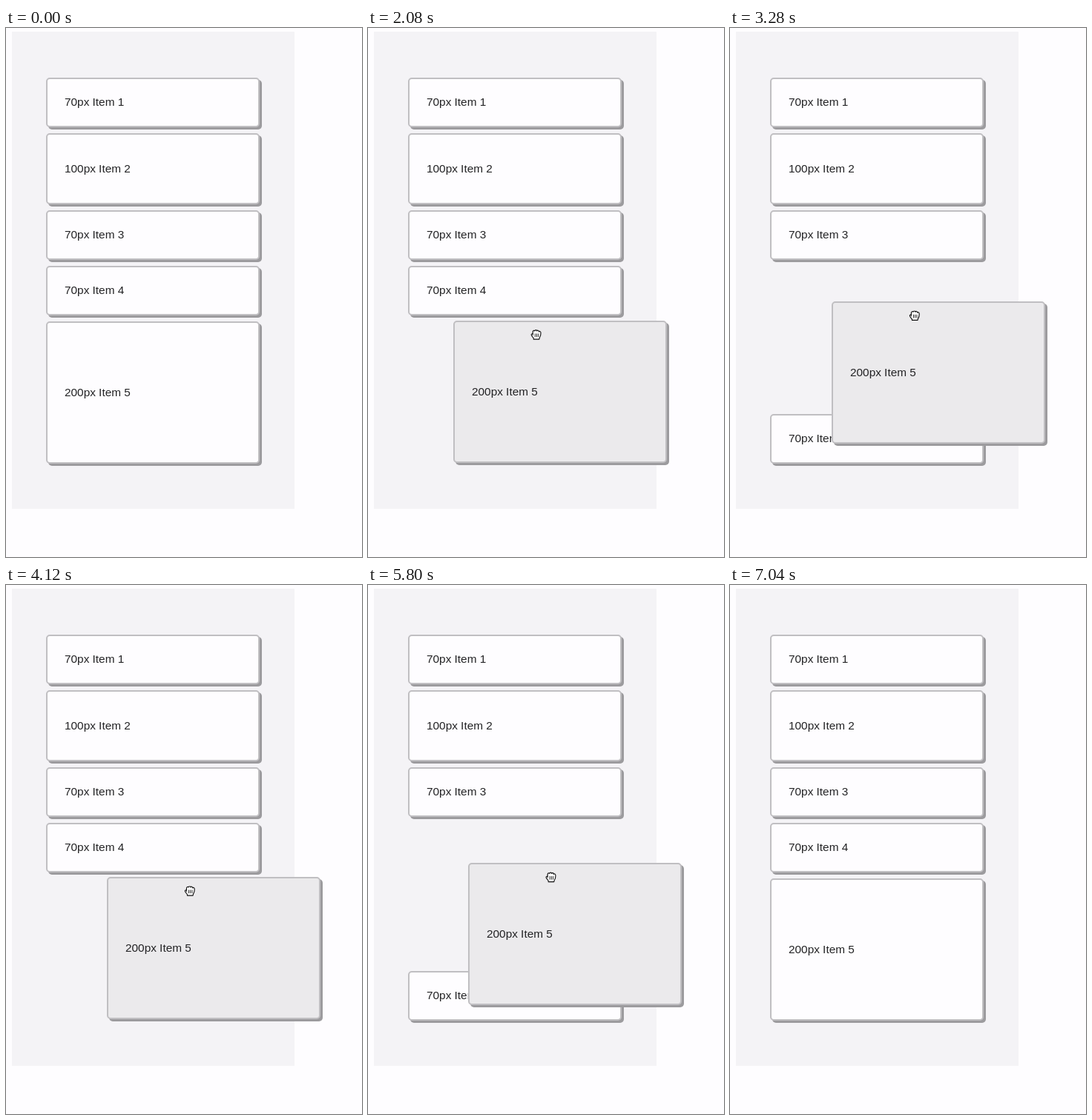
Animation, 480 px wide and 714 px high, one loop 7880 ms. Source, as an HTML page:

```html
<!DOCTYPE html>
<html lang="en">
<head>
<meta charset="utf-8">
<title>Sortable list</title>
<style>
  html, body { margin: 0; width: 100%; height: 100%; overflow: hidden; background: #fefdff; }
  #stage { position: relative; width: 480px; height: 714px; overflow: hidden; }
  .panel { position: absolute; left: 8px; top: 5px; width: 381px; height: 644px; background: #f4f3f6; }
  .card {
    position: absolute; left: 54px; top: var(--y); width: 288px; height: var(--h);
    box-sizing: border-box; padding: 0 0 1px 23px;
    display: flex; align-items: center;
    border: 2px solid #c0bfc2; border-radius: 5px;
    background: #fefdff; box-shadow: 3px 3px #9c9b9e;
    font: 15.36px "Liberation Sans", Arial, sans-serif; color: #232325; white-space: nowrap;
  }
  .card.dragged { background: #ebeaec; z-index: 1; }
  #cursor { position: absolute; left: 0; top: 0; z-index: 2; overflow: visible; }
  #cursor g { display: none; stroke-linejoin: round; stroke-linecap: round; }
  #cursor[data-kind=arrow] .arrow, #cursor[data-kind=grab] .grab, #cursor[data-kind=grabbing] .grabbing { display: inline; }
  .grab, .grabbing { fill: #fff; stroke: #111; stroke-width: 1.15; }
  .arrow { fill: #000; stroke: #fff; stroke-width: 1; }
</style>
</head>
<body>
<div id="stage">
  <div class="panel"></div>
  <div class="card" style="--y:67px;--h:67px">70px Item 1</div>
  <div class="card" style="--y:142px;--h:96px">100px Item 2</div>
  <div class="card" style="--y:246px;--h:67px">70px Item 3</div>
  <div class="card" id="item4" style="--y:321px;--h:67px">70px Item 4</div>
  <div class="card" id="item5" style="--y:396px;--h:192px">200px Item 5</div>
  <svg id="cursor" width="1" height="1">
    <g class="arrow"><path d="M0 0V15.5L3.6 12.2 6 17.5 8.2 16.5 5.9 11.4H10.6Z"/></g>
    <g class="grab" transform="translate(0 -2)">
      <path d="M-4.5 3.5L-7.4 -.2C-8.3 -1.6 -6.6 -2.8 -5.4 -1.6L-4 0L-5.6 -5C-6 -6.8 -3.8 -7.3 -3.2 -5.6L-2.2 -2.2L-2.4 -7C-2.4 -9 .1 -9 .2 -7L.4 -2.4L1.4 -6.8C1.8 -8.6 4 -8.2 3.8 -6.2L3.2 -2L4.8 -4.4C5.6 -6 7.8 -5 7.2 -3.4C6.2 -.4 6.6 1.4 4.8 4.6L4.4 8H-3C-3 6 -3.8 4.8 -4.5 3.5Z"/>
    </g>
    <g class="grabbing">
      <path d="M-4.6 -.8C-6.3 -1.2 -7 -.2 -6.4 1C-5.8 2.4 -4.6 3.6 -3.7 4.8L-3.5 6.4H4L4.4 4.6C5.6 2.8 6.3 1 6.2 -2C6.2 -4.6 4.2 -4.8 3.7 -3.8C3.6 -5.8 1.4 -6 .9 -4.8C.6 -6.4 -1.6 -6.4 -1.9 -4.8C-2.6 -6 -4.6 -5.4 -4.6 -3.4Z"/>
      <path d="M-4.6 -1V1M-1.5 -.8V3M.7 -.8V3M2.9 -.8V3" stroke-width=".9"/>
    </g>
  </svg>
</div>
<script>
const LOOP = 7880, TICK = 40, SHIFT = 200, MOVE = 300;
const GRAB = 1760, DROP = 6180, RELEASE = 6600, LEAVE = 7040;

// CSS-style cubic-bezier timing function
function bezier(x1, y1, x2, y2) {
  const at = (a, b, s) => 3 * a * s * (1 - s) ** 2 + 3 * b * s * s * (1 - s) + s ** 3;
  return p => {
    if (p <= 0) return 0;
    if (p >= 1) return 1;
    let lo = 0, hi = 1;
    for (let i = 0; i < 24; i++) {
      const mid = (lo + hi) / 2;
      if (at(x1, x2, mid) < p) lo = mid; else hi = mid;
    }
    return at(y1, y2, lo);
  };
}
const linear = p => p;
const ease = bezier(.25, .1, .25, 1);
const inOut = bezier(.4, 0, .6, 1);
const outQuad = p => p * (2 - p);
const inQuad = p => p * p;
const snap = bezier(.2, 1, .1, 1);

// Pointer path: [time, x, y, easing towards this point]
const path = [
  [40, 397, 582], [560, 188, 414.5, outQuad], [640, 192, 414.5],
  [800, 192, 414.5], [1080, 170.5, 406.5, inOut],
  [1280, 170.5, 406.5], [1560, 166, 415, inOut],
  [1760, 166, 415], [1880, 178, 416, inQuad], [2360, 252, 412.5, outQuad],
  [2520, 252, 412.5], [2680, 249, 407], [3200, 249, 388],
  [3600, 249, 388], [4160, 248, 413, inOut],
  [4560, 248, 413], [4880, 246, 399.5, inOut],
  [5000, 246, 399.5], [5120, 246.3, 395], [5240, 248, 391], [5360, 247, 392],
  [5720, 247, 392], [6120, 244, 417, inOut],
  [6800, 244, 417], [7000, 119.5, 363, inQuad]
];

// Item 4 makes room and comes back: [start, destination]
const swaps = [[2960, SHIFT], [3830, 0], [5053, SHIFT], [5850, 0]];

function pointer(t) {
  const i = path.findIndex(k => k[0] > t);
  if (i < 0) return path[path.length - 1].slice(1, 3);
  if (i === 0) return path[0].slice(1, 3);
  const [t0, x0, y0] = path[i - 1], [t1, x1, y1, fn = linear] = path[i];
  const p = fn((t - t0) / (t1 - t0));
  return [x0 + (x1 - x0) * p, y0 + (y1 - y0) * p];
}

function roomShift(t) {
  let y = 0;
  for (const [start, to] of swaps) y += (to - y) * ease((t - start) / MOVE);
  return y;
}

function dragOffset(t, [x, y]) {
  if (t < GRAB || t >= DROP + MOVE) return [0, 0];
  const left = 1 - snap((t - DROP) / MOVE);
  return [(x - 166) * left, (y - 415) * left];
}

function cursorKind(t, x) {
  if (t < TICK || t >= LEAVE) return "none";
  if (t >= GRAB && t < RELEASE) return "grabbing";
  return x > 343 ? "arrow" : "grab";
}

const [item4, item5, cursor] = ["item4", "item5", "cursor"].map(id => document.getElementById(id));
const place = (el, x, y) => { el.style.transform = `translate(${x}px, ${y}px)`; };

function draw(t) {
  const pos = pointer(t);
  place(item4, 0, Math.round(roomShift(t)));
  place(item5, ...dragOffset(t, pos).map(Math.round));
  item5.classList.toggle("dragged", t > GRAB && t < DROP + MOVE);
  cursor.dataset.kind = cursorKind(t, pos[0]);
  place(cursor, ...pos);
}

const start = performance.now();
function frame() {
  const t = (performance.now() - start) % LOOP;
  draw(Math.floor(t / TICK) * TICK);
  requestAnimationFrame(frame);
}
frame();
</script>
</body>
</html>
```
